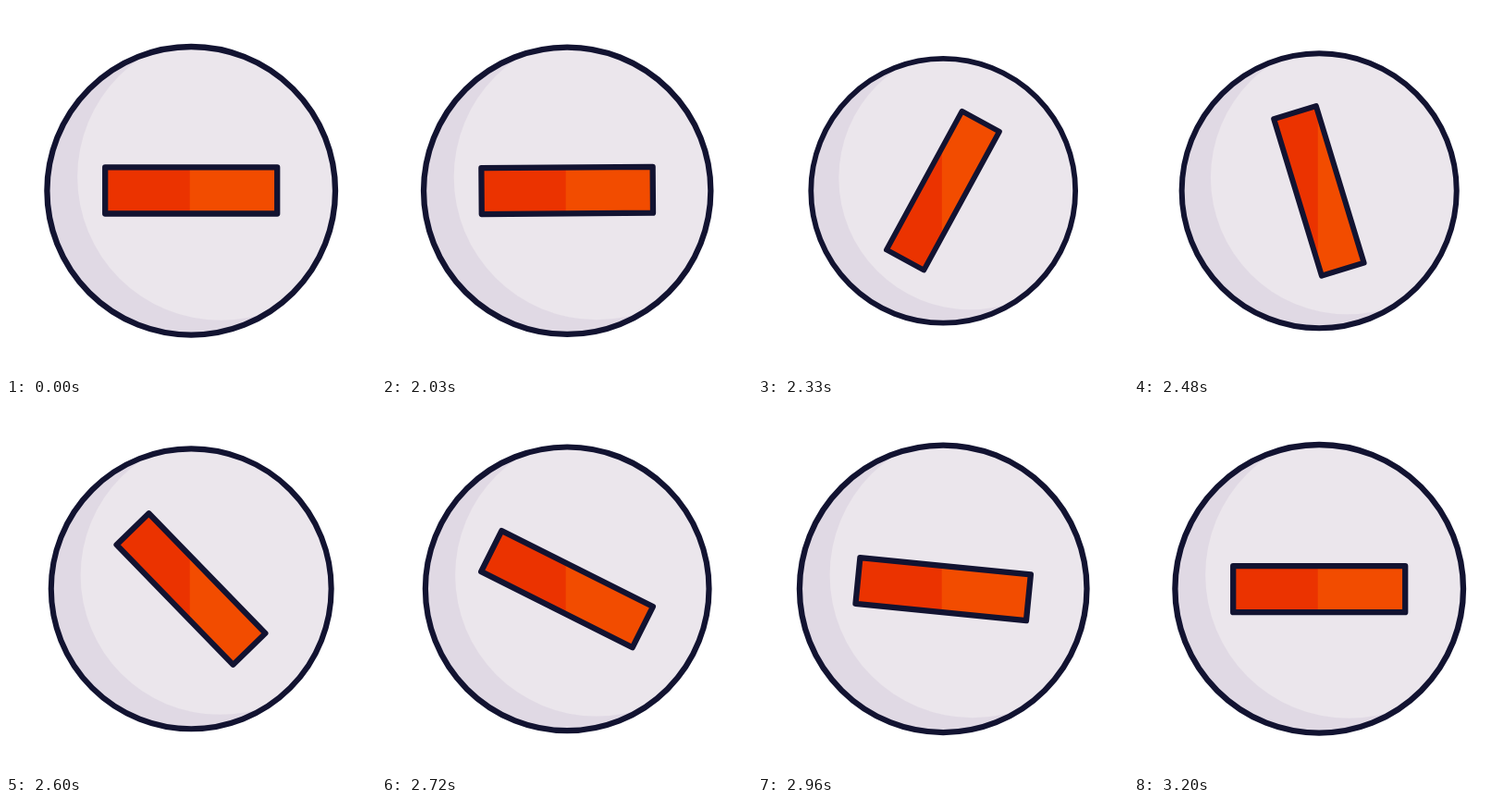
Animation of 400 by 400 pixels, one loop 3.23 s. Source, as an HTML page with a canvas:

```html
<!DOCTYPE html>
<html lang="en">
<head>
<meta charset="utf-8">
<title>Minus button</title>
<style>
  html, body { margin: 0; width: 100%; height: 100%; overflow: hidden; background: #fff; }
  canvas { display: block; width: 100vmin; height: 100vmin; }
</style>
</head>
<body>
<canvas id="stage" width="400" height="400"></canvas>
<script>
const ctx = document.getElementById('stage').getContext('2d');

const LOOP = 3230, START = 2030, STEP = 30, STEPS = 40, SQUEEZE = 7;
const INK = '#121331', LIGHT = '#ebe6ec', SHADE = '#e0d9e4';
const RED = '#eb3300', ORANGE = '#f24c00';
const LINE = 6.3;

// Bezier easing with flat ends: control points (x1, 0) and (x2, 1).
function ease(x, x1, x2) {
  if (x <= 0) return 0;
  if (x >= 1) return 1;
  let lo = 0, hi = 1, s = 0.5;
  for (let i = 0; i < 30; i++) {
    s = (lo + hi) / 2;
    const r = 1 - s;
    const px = 3 * r * r * s * x1 + 3 * r * s * s * x2 + s * s * s;
    if (px < x) lo = s; else hi = s;
  }
  return s * s * (3 - 2 * s);
}

function poseAt(time) {
  const step = time < START ? 0 : Math.floor((time - START) / STEP) + 1;
  const dip = step <= SQUEEZE
    ? ease(step / SQUEEZE, 0.42, 0.58)
    : 1 - ease((step - SQUEEZE) / (STEPS - SQUEEZE), 0.17, 0.17);
  return {
    angle: -Math.PI * ease(step / STEPS, 0.3, 0.3),
    scale: 1 - 0.101 * dip
  };
}

function disc(x, y, r) {
  const path = new Path2D();
  path.arc(x, y, r, 0, Math.PI * 2);
  return path;
}

function paint(path, color) {
  ctx.fillStyle = color;
  ctx.fill(path);
}

function drawButton() {
  const face = disc(0, 0, 155.8);
  paint(face, SHADE);
  ctx.save();
  ctx.clip(face);
  paint(disc(32, -15, 155), LIGHT);
  ctx.restore();
  ctx.stroke(face);
}

function drawBar(angle) {
  const bar = new Path2D(), outline = new Path2D();
  outline.rect(-93, -25.4, 186, 50.1);
  bar.addPath(outline, new DOMMatrix().rotate(angle * 180 / Math.PI));
  paint(bar, ORANGE);
  // The colour split stays upright while the bar turns.
  ctx.save();
  ctx.clip(bar);
  ctx.fillStyle = RED;
  ctx.fillRect(-120, -120, 118.5, 240);
  ctx.restore();
  ctx.stroke(bar);
}

function draw(time) {
  const { angle, scale } = poseAt(time);
  ctx.fillStyle = '#fff';
  ctx.fillRect(0, 0, 400, 400);
  ctx.save();
  ctx.translate(200.2, 199.8);
  ctx.scale(scale, scale);
  ctx.strokeStyle = INK;
  ctx.lineWidth = LINE;
  ctx.lineJoin = 'round';
  drawButton();
  drawBar(angle);
  ctx.restore();
}

const origin = performance.now();
function tick() {
  draw((performance.now() - origin) % LOOP);
  requestAnimationFrame(tick);
}
tick();
</script>
</body>
</html>
```
